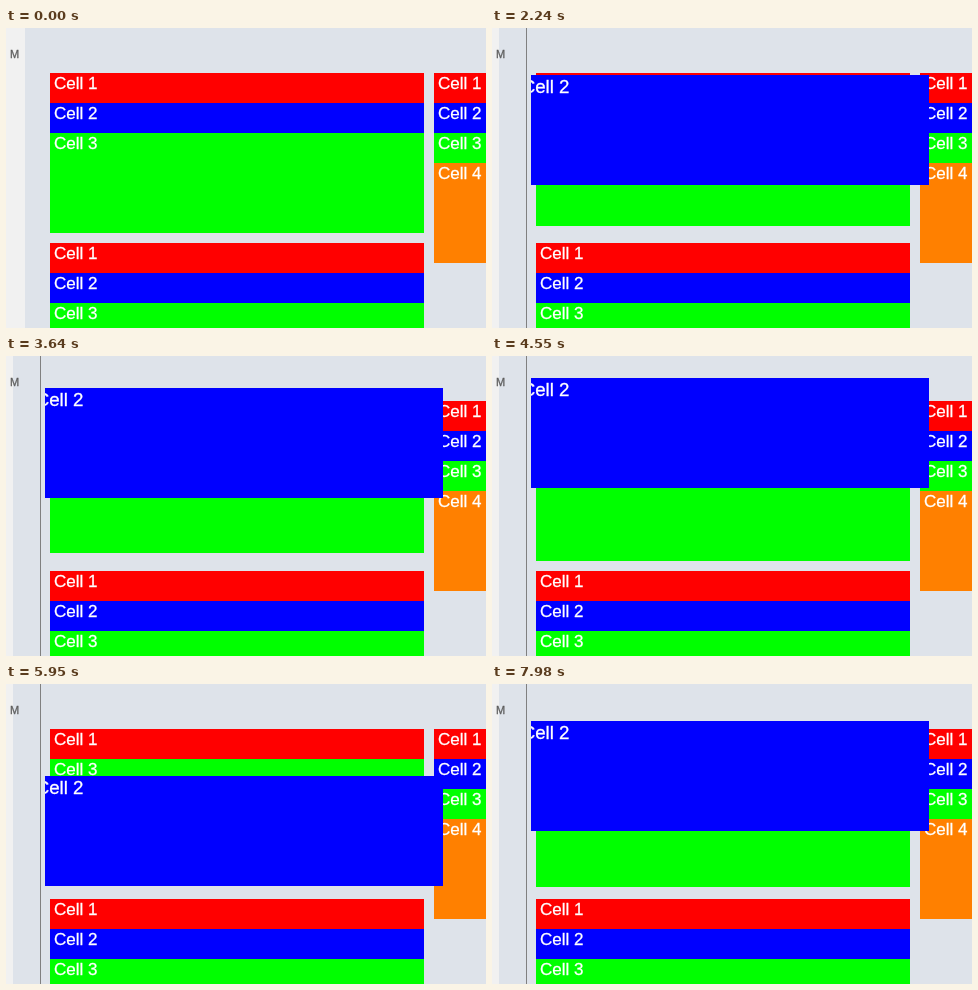
An HTML page that plays this animation: 480 by 300 pixels, repeating every 8000 ms.

```html
<!DOCTYPE html>
<html lang="en">
<head>
<meta charset="utf-8">
<title>Card stacks</title>
<style>
  html, body { margin: 0; width: 100%; height: 100%; overflow: hidden; background: #dee3ea; }
  svg { display: block; width: 480px; height: 300px; }
  rect { shape-rendering: crispEdges; }
  text {
    font-family: "Liberation Sans", Arial, sans-serif; font-size: 17px;
    fill: #fff; stroke: #fff; stroke-width: 0.3px;
  }
  #tab { font-size: 11px; fill: #5c5c5c; stroke: #5c5c5c; }
</style>
</head>
<body>
<svg viewBox="0 0 480 300">
  <clipPath id="list"><rect x="39" width="441" height="300"/></clipPath>
  <rect id="strip" height="300" fill="#f1f1f1"/>
  <rect id="divider" x="34" width="1" height="300" fill="#808080"/>
  <text id="tab" x="4" y="30">M</text>
  <g id="cards" clip-path="url(#list)"></g>
</svg>
<script>
const LOOP = 8000, TICK = 70;
const CARD_W = 374, CARD_H = 100, HEADER = 30, STACK_Y = 45;
const MID_X = 44 + CARD_W / 2;
const COLORS = ["#f00", "#00f", "#0f0", "#ff8000"];
const PANEL_OPEN = 980, LIFT = 1540, SETTLE = 300;
const LIFT_Y = 35, SWAP_Y = 41.6;

// Even strokes of the drag; each starts where the one before it stopped
const strokes = [
  { start: 2030, end: 2520, to: 62 },
  { start: 3010, end: 3940, to: 18 },
  { start: 4490, end: 5040, to: 55 },
  { start: 5200, end: 5810, to: 97 },
  { start: 5880, end: 6300, to: 64 },
  { start: 6580, end: 6790, to: 49 },
  { start: 7000, end: 7350, to: 46 },
  { start: 7490, end: 7980, to: 37 }
];
strokes.forEach((stroke, i) => stroke.from = i ? strokes[i - 1].to : LIFT_Y);

// The third card changes slot whenever a stroke crosses SWAP_Y
const swaps = strokes
  .filter(({ from, to }) => (from - SWAP_Y) * (to - SWAP_Y) < 0)
  .map(({ start, end, from, to }) => ({
    time: start + (end - start) * (SWAP_Y - from) / (to - from),
    dir: to > from ? -1 : 1
  }));

const byId = id => document.getElementById(id);
const cards = byId("cards");

function svgNode(tag, attrs, parent) {
  const node = document.createElementNS("http://www.w3.org/2000/svg", tag);
  for (const key in attrs) node.setAttribute(key, attrs[key]);
  return parent.appendChild(node);
}

function addCard(index, x, y) {
  const card = svgNode("g", { transform: `translate(${x} ${y})` }, cards);
  svgNode("rect", { width: CARD_W, height: CARD_H, fill: COLORS[index] }, card);
  svgNode("text", { x: 4, y: 16 }, card).textContent = `Cell ${index + 1}`;
  return card;
}

function addStack(count, x, y) {
  return Array.from({ length: count }, (_, i) => addCard(i, x, y + i * HEADER));
}

const [, dragged, sliding] = addStack(3, 44, STACK_Y);
addStack(3, 44, 215);
addStack(4, 428, STACK_Y);

const clamp = p => Math.min(1, Math.max(0, p));
const ease = p => (p = clamp(p), p * p * (3 - 2 * p));

function dragTop(t) {
  return Math.round(strokes.reduce((y, { start, end, from, to }) =>
    y + (to - from) * clamp((t - start) / (end - start)), LIFT_Y));
}

function slotTop(t) {
  return Math.round(swaps.reduce((y, { time, dir }) =>
    y + dir * HEADER * ease((t - time) / SETTLE), STACK_Y + 2 * HEADER));
}

function draw(time) {
  // Motion advances in fixed ticks, as in a screen recording
  const t = Math.floor(time % LOOP / TICK) * TICK;
  const open = t >= PANEL_OPEN, lifted = t >= LIFT;

  byId("strip").setAttribute("width", open ? 7 : 19);
  byId("divider").setAttribute("visibility", open ? "visible" : "hidden");
  sliding.setAttribute("transform", `translate(44 ${slotTop(t)})`);

  const scale = 1 + 0.1 * ease((t - LIFT) / SETTLE);
  const x = MID_X - CARD_W / 2 * scale;
  const midY = lifted ? dragTop(t) + 55 : STACK_Y + HEADER + CARD_H / 2;
  const y = midY - CARD_H / 2 * scale;
  dragged.setAttribute("transform", `translate(${x} ${y}) scale(${scale})`);

  // The lifted card is in front of everything; at rest it sits under the third card
  if (lifted && cards.lastChild !== dragged) cards.appendChild(dragged);
  if (!lifted && dragged.nextSibling !== sliding) cards.insertBefore(dragged, sliding);
}

let start;
function frame(now) {
  start ??= now;
  draw(now - start);
  requestAnimationFrame(frame);
}
draw(0);
requestAnimationFrame(frame);
</script>
</body>
</html>
```
